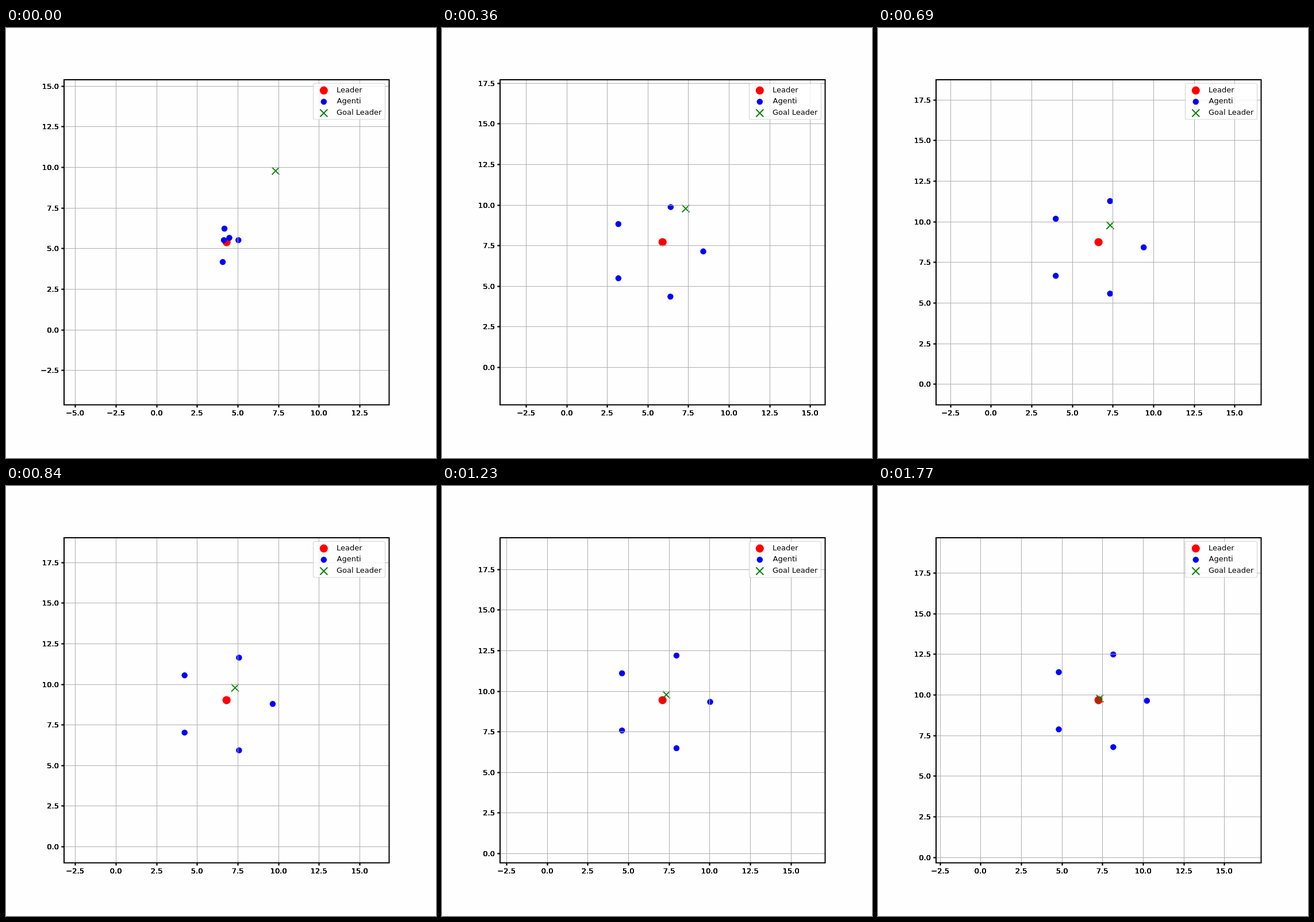
An HTML page with a canvas that plays this animation: 748 by 748 pixels, repeating every 1.8 s.

```html
<!DOCTYPE html>
<html lang="it">
<head>
<meta charset="utf-8">
<title>Leader e agenti</title>
<style>
  html, body { margin: 0; width: 100%; height: 100%; overflow: hidden; background: #fefefe; }
  canvas { display: block; }
</style>
</head>
<body>
<canvas id="stage" width="748" height="748"></canvas>
<script>
const ctx = document.getElementById('stage').getContext('2d');

const STEP_MS = 30, STEPS = 60;
const UNIT = 28.25;                       // pixels per data unit
const MID = { x: 383.7, y: 372.6 };       // the leader stays here
const BOX = { l: 101, t: 90, r: 666.5, b: 655.5 };
const FONT = '13px "DejaVu Sans", Verdana, sans-serif';

const START = { x: 4.303, y: 5.398 };
const GOAL = { x: 7.325, y: 9.787 };
const LEADER_DECAY = 0.9393, AGENT_DECAY = 0.771;
const LAG = 0.305, RADIUS = 3;

// Starting pixels, ordered by slot angle 0, 72, 144, 216, 288 degrees
const AGENTS = [[404.3, 369], [388.5, 365], [379, 369], [380, 349], [377, 407]];

function disc(x, y, r, color) {
  ctx.fillStyle = color;
  ctx.beginPath();
  ctx.arc(x, y, r, 0, Math.PI * 2);
  ctx.fill();
}

function line(x1, y1, x2, y2, color, width) {
  ctx.strokeStyle = color;
  ctx.lineWidth = width;
  ctx.beginPath();
  ctx.moveTo(x1, y1);
  ctx.lineTo(x2, y2);
  ctx.stroke();
}

function cross(x, y) {
  const d = 6.5;
  line(x - d, y - d, x + d, y + d, 'green', 1.9);
  line(x - d, y + d, x + d, y - d, 'green', 1.9);
}

const leaderDot = (x, y) => disc(x, y, 7.1, 'red');
const agentDot = (x, y) => disc(x, y, 5.25, 'blue');

// Repeated drawing gives the heavy edges of the tick labels
function heavyText(text, x, y) {
  ctx.fillStyle = '#000';
  for (let i = 0; i < 4; i++) ctx.fillText(text, x, y);
}

function ticks(center, mid, sign, lo, hi) {
  const list = [];
  for (let v = -5; v <= 20; v += 2.5) {
    const p = mid + sign * (v - center) * UNIT;
    if (p >= lo && p <= hi) {
      list.push({ p: Math.floor(p) + 0.5, label: v.toFixed(1).replace('-', '\u2212') });
    }
  }
  return list;
}

function drawMarkers(step, gap) {
  const left = Math.pow(LEADER_DECAY, step);
  const settle = Math.pow(AGENT_DECAY, step);
  const lag = { x: LAG * gap.x, y: LAG * gap.y };
  leaderDot(MID.x, MID.y);
  AGENTS.forEach(([x0, y0], i) => {
    const a = i * Math.PI * 2 / 5;
    const sx = MID.x + RADIUS * UNIT * Math.cos(a);
    const sy = MID.y - RADIUS * UNIT * Math.sin(a);
    agentDot(sx - lag.x * left - (sx - x0 - lag.x) * settle,
             sy - lag.y * left - (sy - y0 - lag.y) * settle);
  });
  cross(MID.x + gap.x * left, MID.y + gap.y * left);
}

function drawAxes(xs, ys) {
  for (const { p } of xs) line(p, BOX.t, p, BOX.b, '#b0b0b0', 1.04);
  for (const { p } of ys) line(BOX.l, p, BOX.r, p, '#b0b0b0', 1.04);

  ctx.textAlign = 'center';
  for (const { p, label } of xs) {
    line(p, BOX.b, p, BOX.b + 4.7, '#000', 2.2);
    heavyText(label, p - 0.3, 674);
  }
  ctx.textAlign = 'right';
  for (const { p, label } of ys) {
    line(BOX.l - 4.7, p, BOX.l, p, '#000', 2.2);
    heavyText(label, 92, Math.floor(p) + 5);
  }
  ctx.strokeStyle = '#000';
  ctx.lineWidth = 2;
  ctx.strokeRect(BOX.l, BOX.t, BOX.r - BOX.l, BOX.b - BOX.t);
}

function drawLegend() {
  ctx.beginPath();
  ctx.roundRect(534.5, 96.5, 125, 62.5, 2.6);
  ctx.fillStyle = 'rgba(255,255,255,.8)';
  ctx.fill();
  ctx.strokeStyle = 'rgba(204,204,204,.8)';
  ctx.lineWidth = 1.2;
  ctx.stroke();

  leaderDot(552.8, 108.7);
  agentDot(552.8, 128.2);
  cross(552.8, 148);
  ctx.fillStyle = '#000';
  ctx.textAlign = 'left';
  ctx.fillText('Leader', 575, 112);
  ctx.fillText('Agenti', 575.5, 131);
  ctx.fillText('Goal Leader', 575, 151);
}

function draw(step) {
  const left = Math.pow(LEADER_DECAY, step);
  const cx = GOAL.x - (GOAL.x - START.x) * left;
  const cy = GOAL.y - (GOAL.y - START.y) * left;
  const gap = { x: (GOAL.x - START.x) * UNIT, y: (START.y - GOAL.y) * UNIT };

  ctx.fillStyle = '#fefefe';
  ctx.fillRect(0, 0, 748, 748);
  ctx.font = FONT;
  drawMarkers(step, gap);
  drawAxes(ticks(cx, MID.x, 1, BOX.l, BOX.r), ticks(cy, MID.y, -1, BOX.t, BOX.b));
  drawLegend();
}

const begin = performance.now();
function tick() {
  const t = Math.max(0, performance.now() - begin);
  draw(Math.floor(t / STEP_MS) % STEPS);
  requestAnimationFrame(tick);
}
tick();
</script>
</body>
</html>
```
